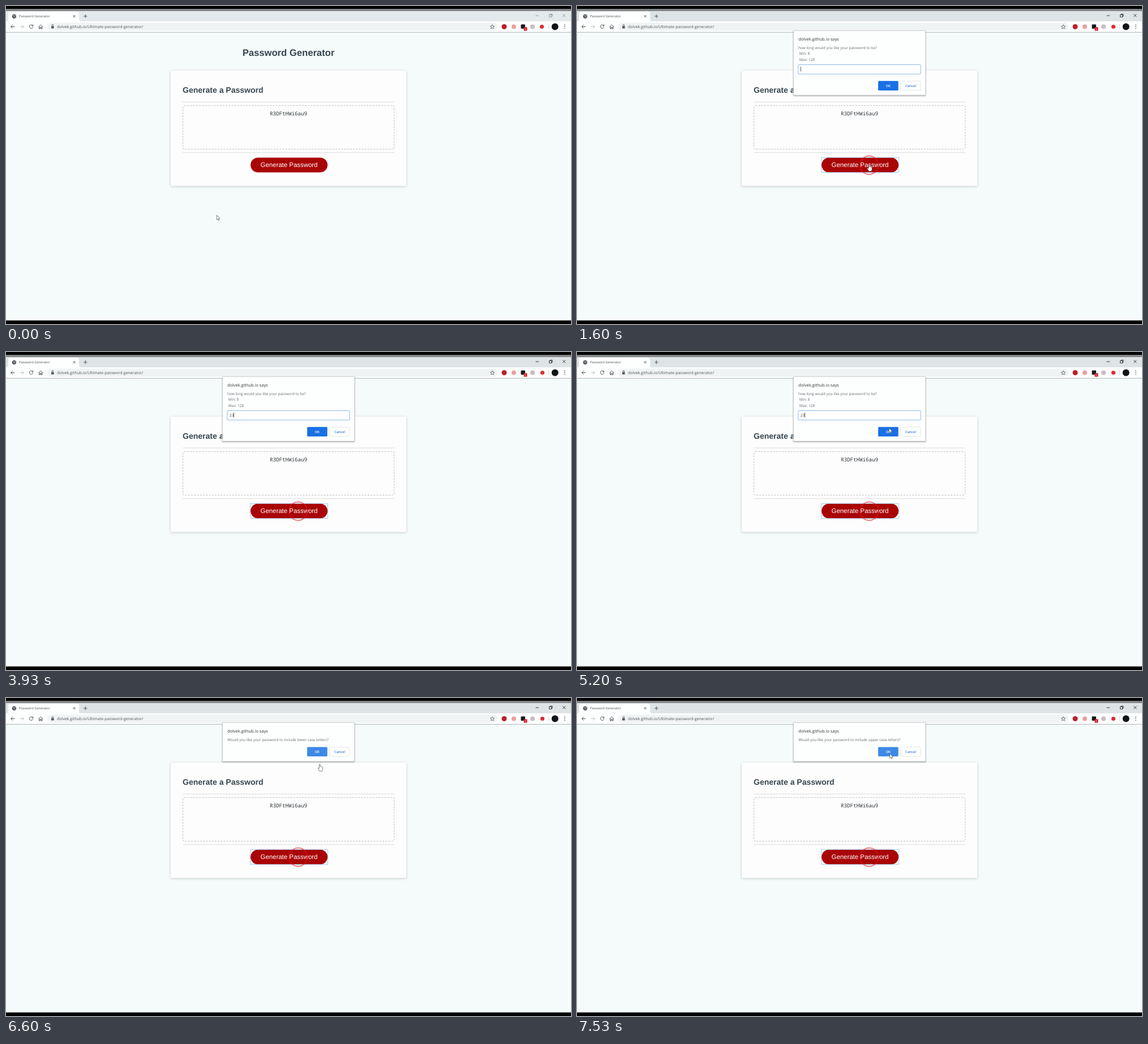
An HTML page that plays this animation: 998x561 px, repeating every 8000 ms.

```html
<!DOCTYPE html>
<html lang="en">
<head>
<meta charset="utf-8">
<title>Password Generator</title>
<style>
  html, body { margin: 0; width: 100%; height: 100%; overflow: hidden; background: #000; }
  svg { display: block; width: 100vw; height: 100vh; }
  text { font-family: "Open Sans", "Noto Sans", sans-serif; text-rendering: geometricPrecision; }
  .page text { font-family: "Liberation Sans", Arial, sans-serif; }
  .page .mono { font-family: "Noto Sans Mono", "DejaVu Sans Mono", monospace; }
  .icon { fill: none; stroke: #50555a; stroke-width: 1; }
  .heading { font-weight: 700; fill: #36454f; }
  .title { font-size: 7.38px; fill: #303438; }
  .body { font-size: 6.47px; fill: #666b70; }
  .label { font-size: 5.9px; font-weight: 600; text-anchor: middle; }
  .panel { fill: #fdfefe; stroke: #c2c6c7; stroke-width: .6; filter: drop-shadow(0 1px 1.2px #0006); }
  .pointer { fill: #fff; stroke: #4b4b4b; stroke-width: .7; stroke-linejoin: round; }
</style>
</head>
<body>
<svg viewBox="0 0 998 561" xmlns="http://www.w3.org/2000/svg">
  <rect width="998" height="561"/>
  <rect y="5" width="998" height="5" fill="#858889"/>
  <rect id="strip" y="9" width="998" height="19" fill="#dee4e5"/>
  <path d="M1 27Q4 27 4 23V14Q4 10 8 10H125Q129 10 129 14V23Q129 27 132 27Z" fill="#fdfefe"/>
  <rect y="27" width="998" height="19" fill="#fdfefe"/>
  <path d="M0 46H998" stroke="#e2e6e7" stroke-width=".8"/>

  <g>
    <circle cx="14.5" cy="18.3" r="3.7" fill="#50555a"/>
    <path d="M12 16.5l2 .5 1 1.5-1.5 1.5M16 15.5l.5 1.5 1.2 .5M16 20.5l1-1" class="icon" style="stroke:#e4e7e8;stroke-width:.8"/>
    <text x="23" y="20.4" font-size="5.75" fill="#50555a">Password Generator</text>
    <path d="M118.500 16l4 4m0-4l-4 4M137 18h6.500M140.250 14.750v6.500" class="icon"/>
    <g id="controls" fill="none" stroke="#25282a" stroke-width=".9">
      <path d="M935.500 17h5.500M983.300 14.200l5 5m0-5l-5 5"/>
      <path d="M959.500 15.500h4v4h-4zM961 15.500v-1.300h4v4h-1.400"/>
    </g>
  </g>

  <g class="icon">
    <path d="M15.300 36.500H8.500m3.200-3.200l-3.200 3.200 3.200 3.200"/>
    <path d="M24.500 36.500h6.800m-3.200-3.200l3.200 3.200-3.200 3.200" stroke="#c0c4c6"/>
    <path d="M47.200 34.500a3.200 3.200 0 1 0 .4 2.700M47.800 32.800v2.500h-2.500"/>
    <path d="M57.500 36.800l3.800-3.600 3.800 3.600M58.700 36v4.200h1.700v-2.600h1.800v2.600h1.700V36"/>
  </g>
  <rect x="73" y="29.500" width="795" height="14" rx="7" fill="#f0f3f4"/>
  <rect x="80" y="35.500" width="4.600" height="4" rx=".5" fill="#50555a"/>
  <path d="M81 35.500v-1.300a1.300 1.300 0 0 1 2.600 0v1.300" class="icon" stroke-width=".8"/>
  <text x="90" y="38.900" font-size="6.96" fill="#50555a">dolvek.github.io/Ultimate-password-generator/</text>
  <path d="M859 33l1.100 2.300 2.500 .3-1.800 1.700 .5 2.500-2.300-1.200-2.300 1.200 .5-2.500-1.800-1.700 2.500-.3z" class="icon" style="stroke-width:.8"/>
  <circle cx="880" cy="36.500" r="4.500" fill="#bd1f2b"/>
  <circle cx="897" cy="36.500" r="4" fill="#eba19c"/>
  <rect x="909.500" y="32.500" width="7.500" height="7.500" rx="1" fill="#17191b"/>
  <rect x="914.500" y="37.300" width="6" height="6.500" rx="1" fill="#d9232e"/>
  <text x="917.500" y="42.500" font-size="5" fill="#fff" text-anchor="middle">1</text>
  <circle cx="930" cy="36.500" r="4" fill="#c9bcc3"/>
  <circle id="recorder" cy="36.500" r="3.600" fill="#e02c34"/>
  <path d="M958.500 32v9" stroke="#cdd1d3" stroke-width=".8"/>
  <circle cx="969.700" cy="36.500" r="6" fill="#101517"/>
  <path d="M987 33.300v.1m0 3v.1m0 3v.1" stroke="#50555a" stroke-width="1.600" stroke-linecap="round"/>

  <g class="page">
    <rect y="46.400" width="998" height="508.300" fill="#f5fbfb"/>
    <text x="499" y="87.900" font-size="16.63" text-anchor="middle" class="heading">Password Generator</text>
    <rect x="291" y="114" width="416" height="203.500" rx="2" fill="#fdfdfd" style="filter:drop-shadow(0 1px 2px #0003)"/>
    <text x="312" y="153.200" font-size="14.03" class="heading">Generate a Password</text>
    <path d="M312 169.300H686M312 258.700H686" stroke="#d8dadb" stroke-width=".9"/>
    <rect x="312.500" y="175.700" width="373.200" height="76.800" rx="2.500" fill="none" stroke="#bcc0c2" stroke-dasharray="3.120 2.080"/>
    <text x="499" y="193.200" font-size="9.17" text-anchor="middle" fill="#2d3338" class="mono">R3DFtHWi6au9</text>
    <rect x="432" y="267.500" width="136" height="26" rx="13" fill="#a90506"/>
    <text x="500" y="284.200" font-size="11.43" fill="#fff" text-anchor="middle">Generate Password</text>
    <g id="clicked" fill="none">
      <rect x="431.700" y="267.300" width="136.600" height="26.400" stroke="#8fbde4" stroke-width=".8"/>
      <circle cx="516" cy="280.800" r="16.200" stroke="#e8141c" stroke-opacity=".55" stroke-width="2"/>
    </g>
  </g>

  <g id="dialog">
    <rect id="panel" class="panel" x="382.300" y="43.700" width="233.400"/>
    <text x="391" y="61.200" class="title">dolvek.github.io says</text>
    <text id="question" x="391" y="75.700" class="body"></text>
    <g id="prompt">
      <text x="392.700" y="86.300" class="body">Min: 8</text>
      <text x="392.700" y="96.700" class="body">Max: 128</text>
      <rect x="390.800" y="103.400" width="216.200" height="16.600" rx="1" fill="#fff" stroke="#6fa9df" stroke-width=".8"/>
      <text id="entry" x="394.800" y="113.900" font-size="6.3" fill="#34383c"></text>
      <path id="caret" d="M0 107v8.500" stroke="#222" stroke-width=".8"/>
    </g>
    <g id="buttons">
      <rect id="ok" x="532" width="35.600" height="16.600" rx="1.500"/>
      <text x="549.700" y="10.700" class="label" fill="#fff">OK</text>
      <rect x="571.800" y=".3" width="35.200" height="16.100" rx="1.500" fill="#fdfefe" stroke="#dadee0" stroke-width=".7"/>
      <text x="589.400" y="10.700" class="label" fill="#3d78cf">Cancel</text>
    </g>
  </g>

  <g id="cursor" class="pointer">
    <path id="arrow" d="M0 0V8.200L1.900 6.500 3.100 9.300 4.300 8.800 3.100 6.100H5.700Z"/>
    <path id="hand" d="M-.9 6.500V1Q-.9 0 0 0T.9 1V4Q2 3.400 2.600 4.300 3.600 3.900 4 4.800 5 4.600 5 5.700V8.500Q5 10 4 12H-.6Q-1.300 10-2.900 7.800-3.500 6.600-2.700 6.200-1.900 5.900-.9 7.200Z"/>
  </g>
</svg>
<script>
  const LOOP = 8000;
  const $ = id => document.getElementById(id);
  const set = (id, attrs) => {
    for (const name in attrs) $(id).setAttribute(name, attrs[name]);
  };
  const show = (id, visible) => set(id, { visibility: visible ? 'inherit' : 'hidden' });

  // [start, end, question, panel height, button y, OK colour]
  const dialogs = [
    [1330, 5650, 'how long would you like your password to be?', 113.5, 132.3, '#1870e4'],
    [5780, 7200, 'Would you like your password to include lower case letters?', 68.2, 86.5, '#3d89e5'],
    [7330, LOOP, 'Would you like your password to include upper case letters?', 68.2, 86.5, '#3d89e5']
  ];

  // [time, x, y] of the pointer's hot spot
  const path = [
    [60, 372.3, 369], [860, 515.5, 278.5], [930, 516, 279.5], [4730, 516, 279.5],
    [5200, 551.3, 134.3], [5530, 551.7, 136], [6200, 551.7, 136],
    [6600, 554.3, 117], [7000, 552.5, 98]
  ];
  const ease = p => p * p * (3 - 2 * p);

  function pointerAt(t) {
    const next = path.findIndex(key => key[0] > t);
    if (next < 1) return (next ? path[path.length - 1] : path[0]).slice(1);
    const [a, b] = [path[next - 1], path[next]];
    const p = ease((t - a[0]) / (b[0] - a[0]));
    return [a[1] + (b[1] - a[1]) * p, a[2] + (b[2] - a[2]) * p];
  }

  // The caret toggles at each of these times, starting visible.
  const blinks = [1870, 2400, 2860, 3400, 3530, 3930, 4460, 4990, 5520];

  function drawDialog(t) {
    const dialog = dialogs.find(([start, end]) => t >= start && t < end);
    show('dialog', dialog);
    if (!dialog) return;
    const [start, , question, height, buttonY, color] = dialog;
    set('dialog', { opacity: Math.min(1, (t - start + 30) / 130) });
    set('panel', { height });
    set('buttons', { transform: `translate(0 ${buttonY})` });
    set('ok', { fill: color });
    $('question').textContent = question;

    const typed = t < 3400 ? '' : t < 3530 ? '2' : '23';
    $('entry').textContent = typed;
    show('prompt', dialog === dialogs[0]);
    set('caret', {
      transform: `translate(${395.2 + typed.length * 3.6} 0)`,
      opacity: blinks.filter(time => time <= t).length % 2 ? 0 : 1
    });
  }

  function drawPointer(t) {
    const [x, y] = pointerAt(t);
    const dialogBottom = t < 5650 ? 157.5 : 112;
    const isHand = t < 1330 ? y < 293 : y > dialogBottom;
    set('cursor', { transform: `translate(${x} ${y})` });
    show('cursor', t < 3400 || t >= 4730);
    show('hand', isHand);
    show('arrow', !isHand);
  }

  function draw(now) {
    const t = now % LOOP;
    const active = t >= 1130;
    set('strip', { fill: active ? '#dee4e5' : '#e4eaeb' });
    set('controls', { opacity: active ? 1 : .45 });
    set('recorder', { cx: active ? 947.5 : 946.5 });
    show('clicked', t >= 1270);
    drawDialog(t);
    drawPointer(t);
  }

  const began = performance.now();
  function tick() {
    draw(performance.now() - began);
    requestAnimationFrame(tick);
  }
  tick();
</script>
</body>
</html>
```
